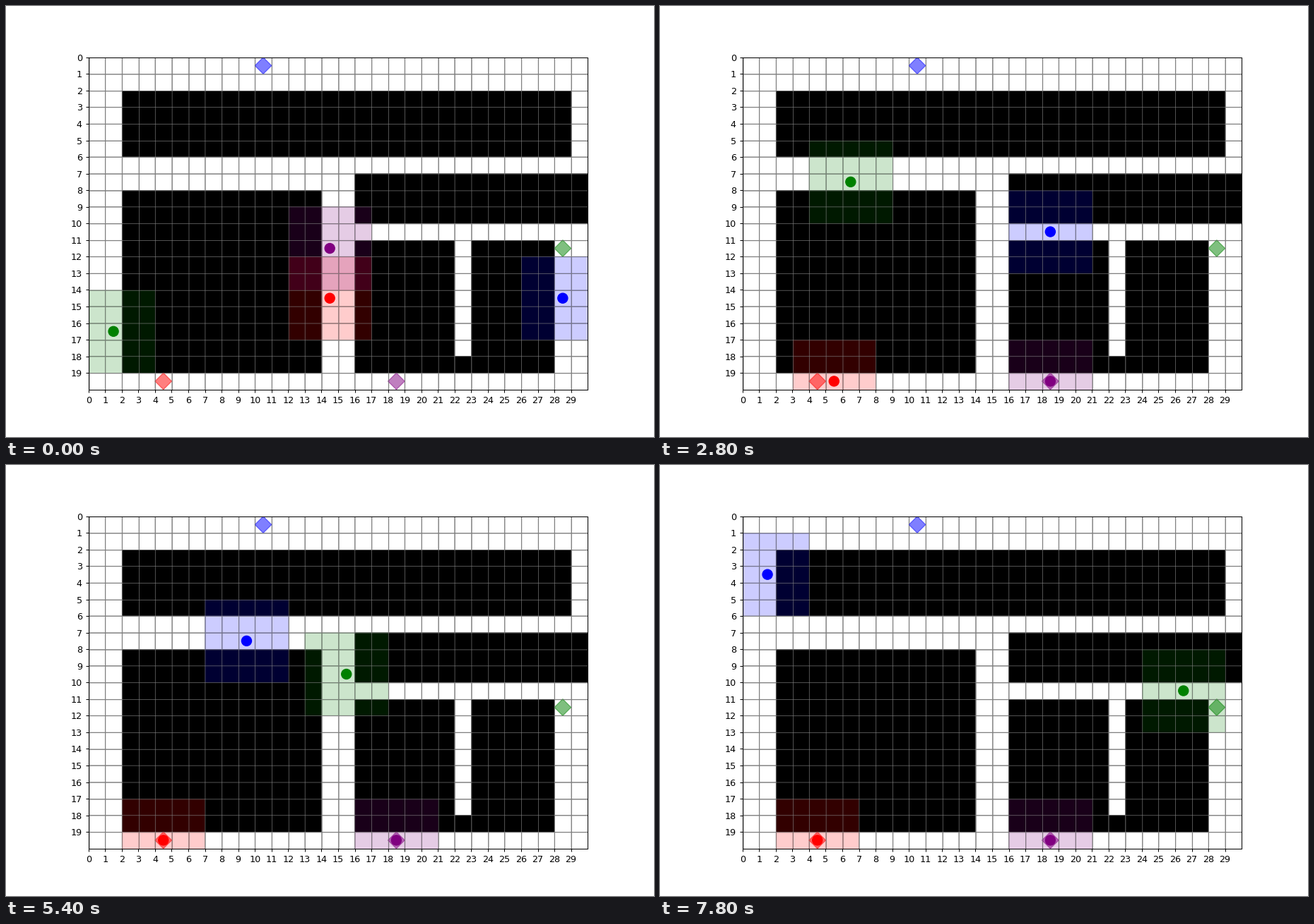
A matplotlib script for the animation above (8000 ms loop, 917 by 611 pixels).

```python
import math

import matplotlib.pyplot as plt
from matplotlib.animation import FuncAnimation
from matplotlib.patches import Circle, Rectangle, RegularPolygon

COLS, ROWS = 30, 20
STEPS, STEP_MS = 40, 200
VIEW = 2  # how many cells an agent sees in each direction

# Cell edges fall on whole pixels of a 1000 x 666 layout, shown at DPI.
DPI = 91.7
LAYOUT_H = 666
CELL = 770 / COLS
LEFT, TOP = 127.5, 79 + 1 / 3

# Walls as (column, row, width, height)
WALLS = [
    (2, 2, 27, 4), (16, 7, 14, 3), (2, 8, 12, 11),
    (16, 11, 6, 8), (23, 11, 5, 8), (22, 18, 1, 1),
]

# colour, start cell, goal cell, route as runs of moves (W = wait)
AGENTS = [
    ("red", (14, 14), (4, 19), "D5 L10"),
    ("blue", (28, 14), (10, 0), "U4 L14 U3 W1 L13 U4"),
    ("green", (1, 16), (28, 11), "U9 R12 U1 R2 D4 R11"),
    ("purple", (14, 11), (18, 19), "D8 R4"),
]
MOVES = {"U": (0, -1), "D": (0, 1), "L": (-1, 0), "R": (1, 0), "W": (0, 0)}


def walk(start, route):
    """Cell at every step; the agent rests once the route is done."""
    cells = [start]
    for run in route.split():
        dx, dy = MOVES[run[0]]
        for _ in range(int(run[1:])):
            x, y = cells[-1]
            cells.append((x + dx, y + dy))
    return cells + [cells[-1]] * (STEPS - len(cells))


def edge(i, origin, shift=0):
    """Position of cell edge i, moved to the nearest layout pixel."""
    return (math.floor(origin + i * CELL + 0.5) + shift - origin) / CELL


def set_cells(rect, x0, y0, x1, y1):
    left, top = edge(x0, LEFT), edge(y0, TOP)
    rect.set_bounds(left, top, edge(x1, LEFT) - left, edge(y1, TOP) - top)


def add_block(colour, **style):
    return ax.add_patch(Rectangle((0, 0), 1, 1, facecolor=colour,
                                  linewidth=0, snap=False, **style))


def draw_grid(width, zorder):
    style = dict(color="gray", linewidth=width, zorder=zorder, snap=False)
    for i in range(COLS):
        ax.axvline(edge(i, LEFT, 0.5), **style)
    for i in range(ROWS):
        ax.axhline(edge(i, TOP, 0.5), **style)


def centre(cell):
    return cell[0] + 0.5, cell[1] + 0.5


fig, ax = plt.subplots(figsize=(917 / DPI, 611 / DPI), dpi=DPI)
fig.subplots_adjust(top=1 - TOP / LAYOUT_H,
                    bottom=1 - (TOP + ROWS * CELL) / LAYOUT_H)
ax.set_xlim(0, COLS)
ax.set_ylim(ROWS, 0)
ax.set_aspect("equal")
ax.set_xticks(range(COLS))
ax.set_yticks(range(ROWS))

# Strong lines on open floor, thin ones across everything
draw_grid(1, 0.5)
draw_grid(0.5, 1.5)

for x, y, w, h in WALLS:
    set_cells(add_block("black"), x, y, x + w, y + h)

for colour, _, goal, _ in AGENTS:
    ax.add_patch(RegularPolygon(centre(goal), 4, radius=0.5, color=colour,
                                alpha=0.5, zorder=1.1))

paths, views, dots = [], [], []
for colour, start, _, route in AGENTS:
    paths.append(walk(start, route))
    views.append(add_block(colour, alpha=0.2, zorder=1.2))
    dots.append(ax.add_patch(Circle(centre(start), 0.3, color=colour,
                                    zorder=1.3)))


def update(step):
    for path, view, dot in zip(paths, views, dots):
        x, y = path[step]
        set_cells(view, max(x - VIEW, 0), max(y - VIEW, 0),
                  min(x + VIEW + 1, COLS), min(y + VIEW + 1, ROWS))
        dot.set_center(centre((x, y)))
    return views + dots


anim = FuncAnimation(fig, update, frames=STEPS, interval=STEP_MS,
                     repeat=True, repeat_delay=0)
plt.show()
```
